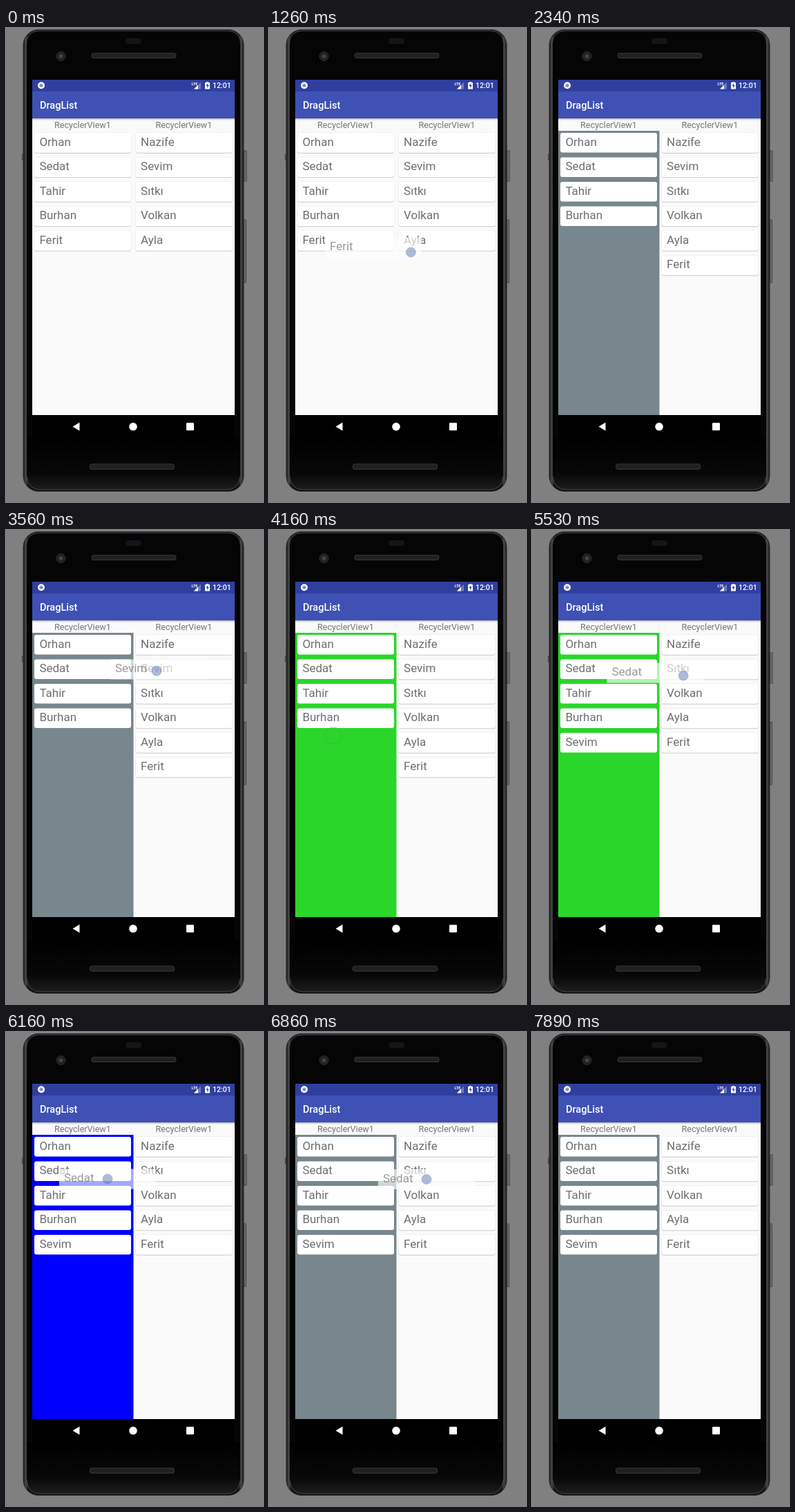
Write an HTML page that moves like this. It is 372 px wide and 687 px high and loops after 8 s.

```html
<!DOCTYPE html>
<html lang="en">
<head>
<meta charset="utf-8">
<title>Drag list</title>
<style>
html, body { margin: 0; width: 100%; height: 100%; overflow: hidden; background: #808080; }
svg { display: block; width: 100vw; height: 100vh; font-family: Roboto, sans-serif; }
.name { font-size: 17px; fill: #6f6f6f; }
.header { font-size: 12.6px; fill: #757575; text-anchor: middle; }
</style>
</head>
<body>
<svg viewBox="0 0 372 687">
  <defs>
    <linearGradient id="rim" x2="1">
      <stop offset="0" stop-color="#161616"/><stop offset=".012" stop-color="#4a4a4a"/>
      <stop offset=".022" stop-color="#101010"/><stop offset=".978" stop-color="#101010"/>
      <stop offset=".988" stop-color="#4a4a4a"/><stop offset="1" stop-color="#161616"/>
    </linearGradient>
    <linearGradient id="chin" x2="0" y2="1">
      <stop offset="0" stop-color="#000"/><stop offset=".7" stop-color="#080808"/>
      <stop offset="1" stop-color="#1c1c1c"/>
    </linearGradient>
    <linearGradient id="barShade" x2="0" y2="1">
      <stop offset="0" stop-color="#000" stop-opacity=".28"/><stop offset="1" stop-color="#000" stop-opacity="0"/>
    </linearGradient>
    <pattern id="mesh" width="2" height="2" patternUnits="userSpaceOnUse">
      <rect width="2" height="2" fill="#1b1b1a"/><rect width="1" height="1" fill="#302f2c"/>
    </pattern>
    <clipPath id="screen"><rect x="38" y="75" width="293" height="486"/></clipPath>
  </defs>

  <rect width="372" height="687" fill="#808080"/>
  <g fill="#6b6b6b" stroke="#3c3c3c" stroke-width=".8">
    <rect x="344.5" y="178" width="3.5" height="44"/>
    <rect x="344.5" y="278" width="3" height="91"/>
    <rect x="23.5" y="183" width="2" height="8"/>
  </g>
  <rect x="25" y="2.5" width="319" height="669" rx="22" fill="url(#rim)" stroke="#2b2b2b"/>
  <rect x="30" y="5" width="309" height="663" rx="19" fill="#050505"/>
  <path d="M30 595H339V649Q339 668 320 668H49Q30 668 30 649Z" fill="url(#chin)"/>
  <path d="M30 650Q32 669 49 669H320Q337 669 339 650" fill="none" stroke="#4c4c4c"/>
  <path d="M28 24Q30 4 48 4H321Q339 4 341 24" fill="none" stroke="#4a4a4a"/>
  <rect x="173" y="15" width="23" height="8" rx="4" fill="#14141b"/>
  <circle cx="79.5" cy="41" r="6.5" fill="#202024" stroke="#303033"/>
  <circle cx="79.5" cy="41" r="3" fill="#42424a"/>
  <rect x="124" y="36.5" width="122" height="7" rx="2.5" fill="url(#mesh)" stroke="#373734"/>
  <rect x="121.5" y="632" width="122" height="7.5" rx="2.5" fill="url(#mesh)" stroke="#373734"/>
  <rect x="38" y="75" width="293" height="520" fill="#000"/>

  <g clip-path="url(#screen)">
    <rect x="38" y="75" width="293" height="486" fill="#fafafa"/>
    <rect id="dropZone" x="38" y="149" width="146.5" height="412"/>
    <text class="header" x="111" y="145">RecyclerView1</text>
    <text class="header" x="257.5" y="145">RecyclerView1</text>
    <g id="cards"></g>
    <rect x="38" y="131" width="293" height="3" fill="url(#barShade)"/>
    <rect x="38" y="92" width="293" height="39" fill="#3f51b5"/>
    <rect x="38" y="75" width="293" height="17" fill="#303f9f"/>
    <text x="49" y="117" font-size="14.5" font-weight="500" fill="#fff">DragList</text>
    <circle cx="51" cy="83.3" r="4" fill="#b8bfdc" stroke="#fff" stroke-width="2"/>
    <circle cx="51" cy="83.3" r="1.8" fill="#7580b5"/>
    <text x="268.5" y="82.5" font-size="5.5" font-weight="700" fill="#fff">LTE</text>
    <path d="M272 88.5L282 78.5V88.5Z" fill="#6f7abb"/>
    <path d="M272 88.5L278 82.5V88.5Z" fill="#fff"/>
    <path d="M288 79H290V78H293V79H295V88.5H288Z" fill="#fff"/>
    <path d="M292 80L289.5 84H291.3V87.3L293.7 83H292Z" fill="#303f9f"/>
    <text x="299" y="87" font-size="10.6" font-weight="500" fill="#fff">12:01</text>
    <g id="shadow">
      <rect width="140" height="29" fill="#fff" fill-opacity=".65"/>
      <text class="name" x="7" y="18.7" fill-opacity=".7"></text>
    </g>
    <circle id="touch"/>
  </g>
  <path d="M96.5 577.7L106.5 571.7V583.7Z" fill="#fff"/>
  <circle cx="184" cy="577.8" r="5.8" fill="#fff"/>
  <rect x="261" y="572.3" width="11" height="11" rx="1" fill="#fff"/>
</svg>
<script>
const LOOP = 8000, LAG = 70;
const $ = id => document.getElementById(id);
const make = (tag, attrs, parent) => {
  const el = document.createElementNS('http://www.w3.org/2000/svg', tag);
  parent.append(el);
  return set(el, attrs);
};
function set(el, attrs) {
  for (const key in attrs) el.setAttribute(key, attrs[key]);
  return el;
}

const lists = [
  [0, 'Orhan Sedat Tahir Burhan Ferit', 'Nazife Sevim Sıtkı Volkan Ayla'],
  [2340, 'Orhan Sedat Tahir Burhan', 'Nazife Sevim Sıtkı Volkan Ayla Ferit'],
  [4600, 'Orhan Sedat Tahir Burhan Sevim', 'Nazife Sıtkı Volkan Ayla Ferit Ferit'],
  [4770, 'Orhan Sedat Tahir Burhan Sevim', 'Nazife Sıtkı Volkan Ayla Ferit']
];
const zoneColors = [
  [0, 'none'], [1330, '#78868d'], [3750, '#2ad62a'],
  [5570, '#78868d'], [5860, '#0000ff'], [6600, '#78868d']
];
// Each path point is [time, x, y]
const drags = [
  { name: 'Ferit', press: 870, lift: 1150, drop: 1680,
    path: [[1140, 111, 312], [1260, 205, 325], [1390, 257, 325.5]] },
  { name: 'Sevim', press: 3170, lift: 3510, drop: 3950,
    path: [[3550, 221, 202], [3700, 180, 232], [3860, 93, 298]] },
  { name: 'Sedat', press: 4770, lift: 5270, drop: 7640,
    path: [[5370, 125, 202], [5530, 219, 211], [5560, 223, 212], [5680, 223, 213],
           [6050, 147, 213], [6440, 147, 213], [6700, 228, 213.5],
           [7410, 228, 213.5], [7560, 242, 265]] }
];

const current = (table, t) => table.filter(row => row[0] <= t).pop();

function along(path, t) {
  const i = path.findIndex(p => p[0] > t);
  if (i < 0) return path[path.length - 1].slice(1);
  if (i === 0) return path[0].slice(1);
  const [a, b] = [path[i - 1], path[i]];
  const k = (t - a[0]) / (b[0] - a[0]);
  return [a[1] + (b[1] - a[1]) * k, a[2] + (b[2] - a[2]) * k];
}

function drawCards([, left, right], tinted) {
  const parent = $('cards');
  parent.replaceChildren();
  [left, right].forEach((names, col) => names.split(' ').forEach((name, row) => {
    const x = col ? 187.7 : 41, y = 152 + row * 35.5;
    const box = { x, y, width: 140, height: 28.5, rx: 3 };
    if (col || !tinted) {
      make('rect', { ...box, y: y + 1.2, fill: '#c9c9c9' }, parent);
      make('rect', { ...box, fill: 'none', stroke: '#e6e6e6' }, parent);
    }
    make('rect', { ...box, fill: '#fff' }, parent);
    make('text', { class: 'name', x: x + 7.4, y: y + 18.6 }, parent).textContent = name;
  }));
}

function drawTouch(drag, t) {
  const [cx, cy] = along(drag.path, t);
  const since = t - drag.drop;
  if (since < 0) {
    const grow = Math.min(1, (t - drag.press) / 120);
    set($('touch'), { cx, cy, r: 12 - 5 * grow, fill: '#5c78b8', 'fill-opacity': .5 * grow,
      stroke: '#5f6f9d', 'stroke-opacity': .3 });
  } else {
    const k = since / 250;
    set($('touch'), { cx, cy, r: 7 + 6 * k, fill: '#5c78b8', 'fill-opacity': Math.max(0, .4 - k),
      stroke: '#777b83', 'stroke-opacity': Math.max(.6 - .1 * k, 0) });
  }
}

let shown = '';
function render(t) {
  const list = current(lists, t), color = current(zoneColors, t)[1];
  if (shown !== list[0] + color) {
    shown = list[0] + color;
    set($('dropZone'), { fill: color });
    drawCards(list, color !== 'none');
  }
  const drag = drags.find(d => t >= d.press && t < d.drop + 250);
  const lifted = drag && t >= drag.lift && t < drag.drop + 30;
  set($('touch'), { visibility: drag ? 'visible' : 'hidden' });
  set($('shadow'), { visibility: lifted ? 'visible' : 'hidden' });
  if (drag) drawTouch(drag, t);
  if (lifted) {
    const [x, y] = along(drag.path, t - LAG);
    set($('shadow'), { transform: `translate(${x - 70} ${y - 14.5})` });
    $('shadow').lastElementChild.textContent = drag.name;
  }
}

const start = performance.now();
function tick() {
  render((performance.now() - start) % LOOP);
  requestAnimationFrame(tick);
}
tick();
</script>
</body>
</html>
```
